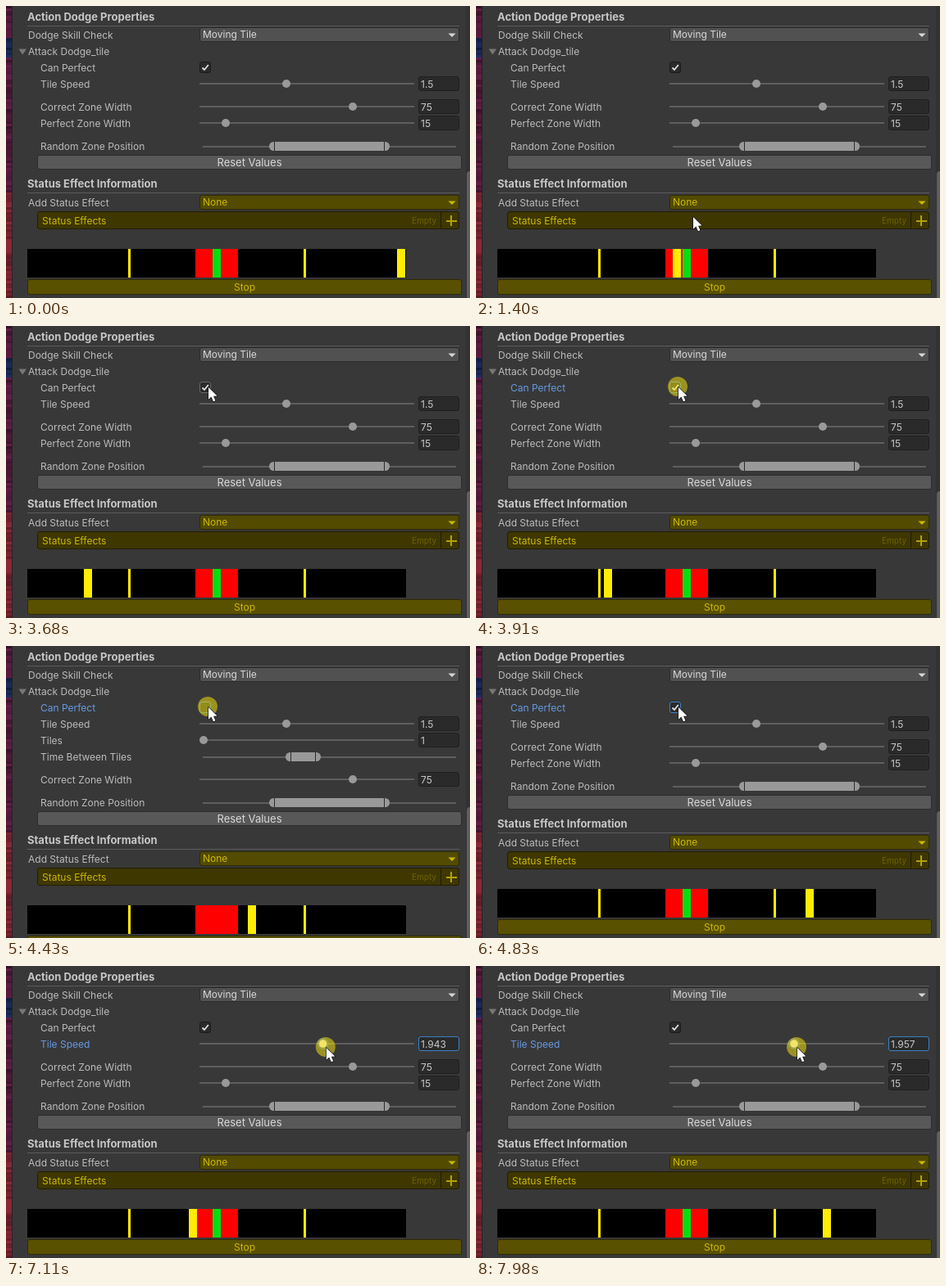
An HTML page with a canvas for the animation above (8 s loop, 566x357 px).

```html
<!DOCTYPE html>
<html lang="en">
<head>
<meta charset="utf-8">
<title>Inspector</title>
<style>
html, body { margin: 0; width: 100%; height: 100%; overflow: hidden; background: #383838; }
canvas { display: block; }
</style>
</head>
<body>
<canvas id="stage" width="566" height="357"></canvas>
<script>
const ctx = document.getElementById('stage').getContext('2d');
const LOOP = 8000;
const FONT = 'Inter, Roboto, sans-serif';
const TEXT = '#bcbcbc', BLUE = '#6799e2', YELLOW = '#ffeb04', GOLD = '#cdb900';
const CYCLE = 2825, FIRST = 599;
const ENTER = 110, PRESS = 3900, UNCHECK = 4020, REPRESS = 4380, RECHECK = 4500;
const DRAG = 5850, DROP = 7350;

const between = (t, a, b) => t >= a && t < b;

// Eased progress from 0 to 1 between two times
function ease(t, a, b) {
  const u = Math.min(1, Math.max(0, (t - a) / (b - a)));
  return Math.sin(u * Math.PI / 2);
}

// The tile crosses the bar, then waits at the end for the next cycle
function tileX(t) {
  const speed = t < FIRST + 2 * CYCLE ? .267 : .229;
  const phase = (t - FIRST + CYCLE) % CYCLE;
  return Math.round(Math.min(477, 26 + phase * speed));
}

function mouseAt(t) {
  const enter = ease(t, ENTER, 1200), up = ease(t, 1460, 1900);
  const right = ease(t, 4930, 5690), drag = ease(t, DRAG, DROP);
  return [
    325 - 61 * enter - 18 * up + 106 * right + 39 * drag,
    338 - 81 * enter - 183 * up + 24 * right + drag
  ];
}

function rect(x, y, w, h, color) {
  ctx.fillStyle = color;
  ctx.fillRect(x, y, w, h);
}

function box(x, y, w, h, fill, border) {
  ctx.beginPath();
  ctx.roundRect(x + .5, y + .5, w - 1, h - 1, 2.5);
  ctx.fillStyle = fill;
  ctx.fill();
  ctx.strokeStyle = border;
  ctx.lineWidth = 1;
  ctx.stroke();
}

function text(str, x, mid, color = TEXT, size = 12, weight = 400, align = 'left') {
  ctx.font = `${weight} ${size}px ${FONT}`;
  ctx.textAlign = align;
  ctx.fillStyle = color;
  ctx.fillText(str, x, Math.ceil(mid + size * .365));
}

function poly(points, fill) {
  ctx.beginPath();
  points.forEach(([x, y]) => ctx.lineTo(x, y));
  ctx.closePath();
  ctx.fillStyle = fill;
  ctx.fill();
}

function disc(x, y, r, color) {
  ctx.beginPath();
  ctx.arc(x, y, r, 0, Math.PI * 2);
  ctx.fillStyle = color;
  ctx.fill();
}

function heading(str, mid) {
  text(str, 26, mid, '#c6c6c6', 13, 700);
  rect(26, mid + 11, 527, 1, '#5c5c5c');
}

function dropdown(str, mid, fill, border, color) {
  box(236, mid - 9, 317, 18, fill, border);
  text(str, 240, mid - 1, color);
  poly([[539.5, mid - 1.5], [548.5, mid - 1.5], [544, mid + 3]], color);
}

function slider(label, mid, x, value, focus) {
  text(label, 42, mid, focus ? BLUE : TEXT);
  rect(236, mid - 1, 262, 2, '#5e5e5e');
  if (focus) disc(x, mid, 7, 'rgba(60,120,190,.6)');
  disc(x, mid, 5, '#999');
  box(503, mid - 9, 50, 18, '#2a2a2a', focus ? '#3e80c4' : '#1f1f1f');
  text(value, 506, mid, '#cacaca');
}

function range(label, mid, a, b) {
  text(label, 42, mid);
  rect(240, mid, 309, 2, '#5e5e5e');
  ctx.beginPath();
  ctx.roundRect(a, mid - 5, b - a, 11, 5.5);
  ctx.fillStyle = '#999';
  ctx.fill();
  rect(a + 6, mid - 5, 1, 11, '#2c2c2c');
  rect(b - 7, mid - 5, 1, 11, '#2c2c2c');
}

function checkbox(checked, focus, hover) {
  text('Can Perfect', 42, 75, focus ? BLUE : TEXT);
  box(236, 68, 14, 14, '#2a2a2a', focus ? '#3e80c4' : hover ? '#686868' : '#1a1a1a');
  if (!checked) return;
  ctx.beginPath();
  ctx.moveTo(239.5, 75.5);
  ctx.lineTo(242, 78);
  ctx.lineTo(246.8, 72);
  ctx.strokeStyle = '#e0e0e0';
  ctx.lineWidth = 1.8;
  ctx.stroke();
}

function scene() {
  let seed = 7;
  const rnd = () => (seed = seed * 16807 % 2147483647) / 2147483647;
  for (let y = 0; y < 357; y += 3) {
    const red = y > 225, navy = between(y, 38, 62);
    const hue = red ? 352 : navy ? 225 : 325;
    rect(0, y, 7, 3, `hsl(${hue} 55% ${(red ? 24 : 14) + rnd() * 12}%)`);
  }
  rect(7, 0, 1, 357, '#242424');
}

function lower(tile, checked) {
  range('Random Zone Position', 171, 321, 468);
  box(38, 182, 518, 18, '#585858', '#2c2c2c');
  text('Reset Values', 297, 191, '#d8d8d8', 13, 400, 'center');
  heading('Status Effect Information', 217);
  text('Add Status Effect', 27, 240);
  dropdown('None', 240, '#524b00', '#302b00', GOLD);

  box(38, 251, 515, 22, '#3e3700', '#211d00');
  text('Status Effects', 44, 262, GOLD);
  text('Empty', 525, 262, '#6c6200', 10, 400, 'right');
  rect(530, 252, 1, 20, '#211d00');
  rect(537, 262, 13, 2, '#b5a300');
  rect(542, 256, 2, 13, '#b5a300');

  rect(26, 297, 462, 35, '#000');
  rect(149, 297, 3, 35, YELLOW);
  rect(363, 297, 3, 35, YELLOW);
  rect(231, 297, 52, 35, '#f00');
  if (checked) rect(252, 297, 10, 35, '#00e010');
  rect(tile, 297, 10, 35, YELLOW);
  box(26, 334, 530, 19, '#595100', '#302b00');
  text('Stop', 291, 343, GOLD, 12, 400, 'center');
}

function cursor(x, y) {
  ctx.save();
  ctx.translate(x + 1, y + 1);
  ctx.scale(.92, .92);
  ctx.beginPath();
  [[0, 0], [0, 16], [3.7, 12.6], [6.4, 18.8], [9.2, 17.6], [6.6, 11.6], [11.5, 11.4]]
    .forEach(p => ctx.lineTo(...p));
  ctx.closePath();
  ctx.lineJoin = 'round';
  ctx.lineWidth = 1.5;
  ctx.strokeStyle = '#111';
  ctx.stroke();
  ctx.fillStyle = '#fff';
  ctx.fill();
  ctx.restore();
}

function draw(t) {
  const checked = !between(t, UNCHECK, RECHECK);
  const drag = t >= DRAG, moved = ease(t, DRAG, DROP);
  const knob = 342 + 46 * moved;
  const speed = String(+(1.5 + .457 * moved).toFixed(3));
  const [mx, my] = mouseAt(t);

  rect(0, 0, 566, 357, '#383838');
  scene();
  rect(561, 0, 5, 357, '#323232');
  ctx.beginPath();
  ctx.roundRect(562, checked ? 202 : 197, 9, 200, 4);
  ctx.fillStyle = '#5e5e5e';
  ctx.fill();

  heading('Action Dodge Properties', 13);
  text('Dodge Skill Check', 27, 35);
  dropdown('Moving Tile', 35, '#515151', '#2c2c2c', '#d8d8d8');
  poly([[15.5, 52.5], [25, 52.5], [20.2, 59.5]], '#777');
  text('Attack Dodge_tile', 27, 55);
  checkbox(checked, between(t, PRESS, DRAG), between(mx, 236, 250) && my < 82);
  slider('Tile Speed', 95, knob, speed, drag);

  ctx.save();
  if (!checked) {
    slider('Tiles', 115, 241, '1');
    range('Time Between Tiles', 135, 341, 384);
    ctx.translate(0, 20);
  }
  slider('Correct Zone Width', checked ? 123 : 143, 423, '75');
  if (checked) slider('Perfect Zone Width', 143, 268, '15');
  lower(tileX(t), checked);
  ctx.restore();

  if (drag || between(t, PRESS, UNCHECK) || between(t, REPRESS, RECHECK)) {
    disc(mx, my, 12, 'rgba(255,235,10,.5)');
    if (drag) disc(knob, 95, 4.5, 'rgba(255,240,110,.75)');
  }
  if (t >= ENTER) cursor(mx, my);
}

function frame() {
  draw(performance.now() % LOOP);
  requestAnimationFrame(frame);
}
frame();
</script>
</body>
</html>
```
